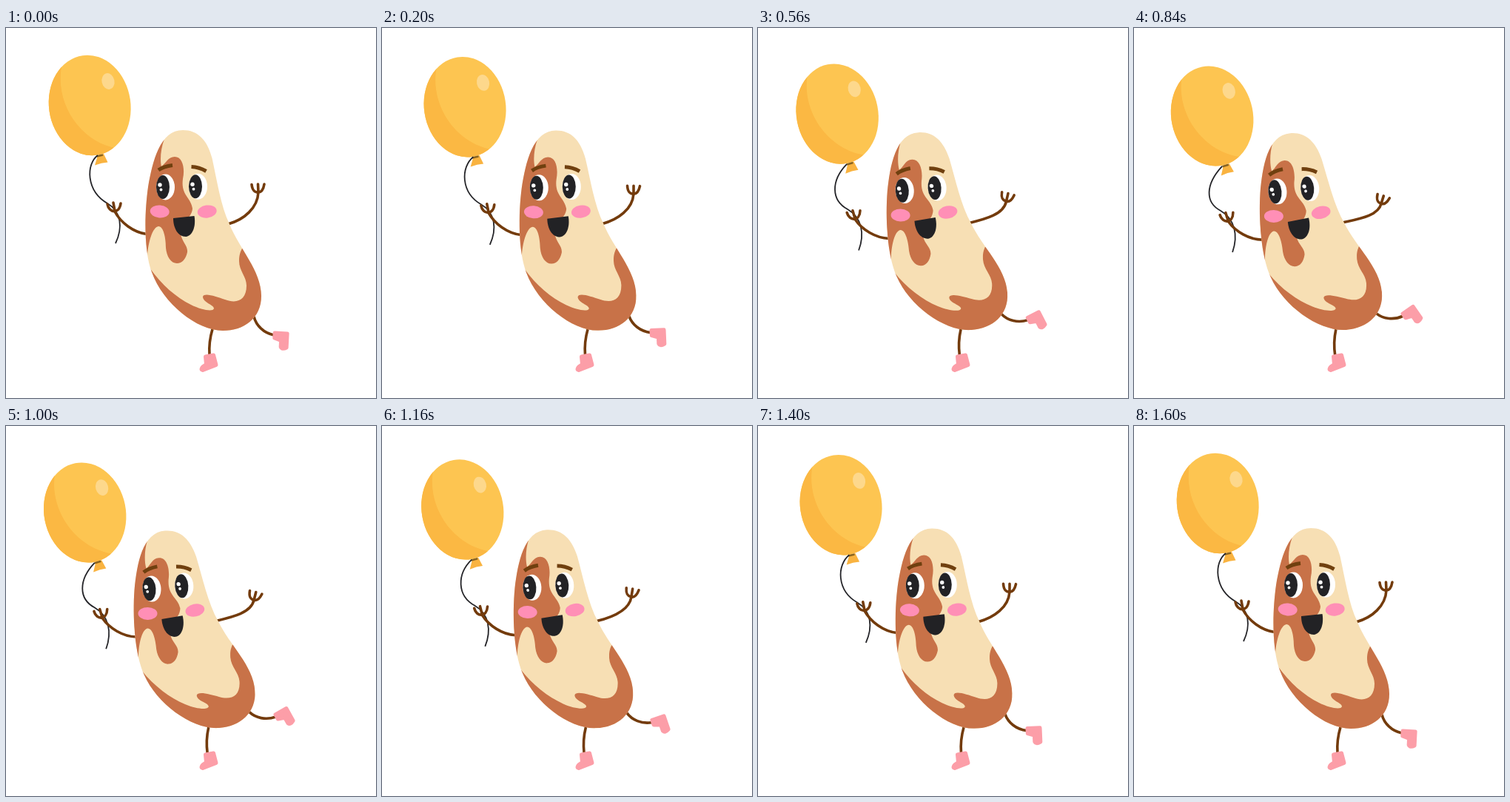
Write an HTML page that moves like this. It is 500 by 500 pixels and loops after 1680 ms.

```html
<!DOCTYPE html>
<html lang="en">
<head>
<meta charset="utf-8">
<title>Bean with a balloon</title>
<style>
  html, body { margin: 0; height: 100%; overflow: hidden; background: #fff; }
  svg { display: block; width: 100%; height: 100%; }
  .limb { fill: none; stroke: #733b0c; stroke-width: 3.6; stroke-linecap: round; }
  .brow { fill: none; stroke: #70400f; stroke-width: 5; }
  .boot { fill: #fc9ea8; stroke: #fc9ea8; stroke-width: 5; stroke-linejoin: round; }
  .brown { fill: #c87248; }
  .dark { fill: #222225; }
  .white { fill: #fff; }
  .cheek { fill: #ff8fb6; }
</style>
</head>
<body>
<svg viewBox="0 0 500 500">
  <defs>
    <path id="bean" d="M239 138C259 138 272 151 278.5 176C285 205 290 240 302 265C315 298 345 328 345 362C345 392 322 409 293 409C258 409 212 372 197 330C186 300 187 250 192 215C198 180 208 138 239 138Z"/>
    <ellipse id="bulb" cx="113.2" cy="104.5" rx="55.2" ry="68" transform="rotate(-8 113.2 104.5)"/>
    <g id="eye">
      <ellipse class="white" cx="3.5" rx="12.5" ry="17.5"/>
      <ellipse class="dark" rx="9" ry="16"/>
      <circle class="white" cx="-4" cy="-3" r="2.7"/>
      <circle class="white" cx="-2.5" cy="3.5" r="1.9"/>
    </g>
    <clipPath id="inBean"><use href="#bean"/></clipPath>
    <clipPath id="inBulb"><use href="#bulb"/></clipPath>
  </defs>

  <g id="balloon">
    <path fill="#f9b340" d="M124 172L132 170L137.5 181.5Q129 182 120 185.5Z"/>
    <use href="#bulb" fill="#fdc551"/>
    <path fill="#fbb843" clip-path="url(#inBulb)" d="M76 48C64 100 100 155 152 163L120 190L40 150V50Z"/>
    <ellipse cx="138" cy="72" rx="8.5" ry="11" fill="#fdd88c" transform="rotate(-12 138 72)"/>
    <path stroke="#8a6420" stroke-width="2.6" d="M122.5 173.5L131 171.5"/>
  </g>
  <path id="string" fill="none" stroke="#242428" stroke-width="1.8"/>
  <path id="rightArm" class="limb"/>
  <path id="rightHand" class="limb" d="M-9 -10.5C-8 -2 -5 0 0 0C5 0 7 -5 8 -11M0 0L-.5 -11"/>

  <g id="body">
    <path class="limb" d="M279 407C276 417 274 428 275 442"/>
    <g id="leg">
      <path class="limb" d="M335 390C338 402 348 412 362 415"/>
      <path class="boot" transform="rotate(3 362 415)" d="M363 412L380 412V431Q374 434.5 372 430.5V422L363 419Z"/>
    </g>
    <path id="leftArm" class="limb" d="M190 278.5C172 276 155 263 147 248M137 238C139 250 153 252 155 237M147 247L145 236"/>

    <use href="#bean" fill="#f7dfb4"/>
    <g class="brown" clip-path="url(#inBean)">
      <path d="M214 150C209 163 208 178 210 187C216 183 219 174 228 174C239 174 242 190 239 204C236 226 250 229 252 244C251 258 235 262 236 278C238 290 246 294 245 303C243 312 238 318 231 318C223 318 217 309 216 297C216 284 213 268 206 268C198 269 192 290 191 308H170L180 150Z"/>
      <path d="M194 324C210 347 230 364 250 374C264 381 280 384 281 379C281 374 266 371 266 363C268 357 284 363 296 367C312 373 325 368 325 348C325 336 315 328 315 315C315 306 317 302 319 298L360 300V420H180Z"/>
    </g>

    <path class="brow" d="M206 192Q213 187 225 185.5M250.5 187.5Q261 188 270.500 193.500"/>
    <use href="#eye" x="212" y="215"/>
    <use href="#eye" x="256" y="214.2"/>
    <ellipse class="cheek" cx="207.7" cy="248" rx="13" ry="8.5" transform="rotate(5 208 248)"/>
    <ellipse class="cheek" cx="271.7" cy="248" rx="13" ry="8.5" transform="rotate(-8 272 248)"/>
    <path class="dark" d="M226 257L254.5 254C257 268 252 281 243 282C232 282 226 270 226 257Z"/>
  </g>
  <path class="boot" d="M269.5 444L280.5 442L284 455.5L266 462.5Q262 461.5 266 457.5L270.5 454.5Z"/>
</svg>

<script>
const LOOP = 1680, SWING = 1600, STEP = 40;
const $ = id => document.getElementById(id);

// Bezier control points at both ends of the swing
const curves = {
  string: [
    [124, 172, 108, 184, 108, 220, 137, 237, 156, 248, 158, 270, 148, 291],
    [119, 187, 96, 212, 96, 236, 117, 247, 136, 258, 141, 280, 133, 303]
  ],
  rightArm: [
    [300, 265, 322, 259, 340, 243, 341, 222],
    [282, 263, 304, 258, 330, 254, 334, 237.5]
  ]
};

const place = (id, transform) => $(id).setAttribute("transform", transform);

function draw(ms) {
  const t = Math.floor((ms % LOOP) / STEP) * STEP;
  const p = (1 - Math.cos(2 * Math.PI * t / SWING)) / 2 * (t < SWING);

  place("body", `rotate(${-4.7 * p} 277 482)`);
  place("leg", `rotate(${-33 * p} 335 390)`);
  place("leftArm", `rotate(${-2.5 * p} 189 278)`);
  place("rightHand", `translate(${341 - 7 * p} ${222 + 15.5 * p}) rotate(${20 * p})`);
  place("balloon", `translate(${-7.6 * p} ${14.6 * p}) rotate(${-3.8 * p} 113.5 104.8)`);

  for (const [id, [from, to]] of Object.entries(curves)) {
    const [x, y, ...rest] = from.map((v, i) => v + (to[i] - v) * p);
    $(id).setAttribute("d", `M${x} ${y}C${rest.join(" ")}`);
  }
}

const start = performance.now();
function tick() {
  draw(performance.now() - start);
  requestAnimationFrame(tick);
}
tick();
</script>
</body>
</html>
```
